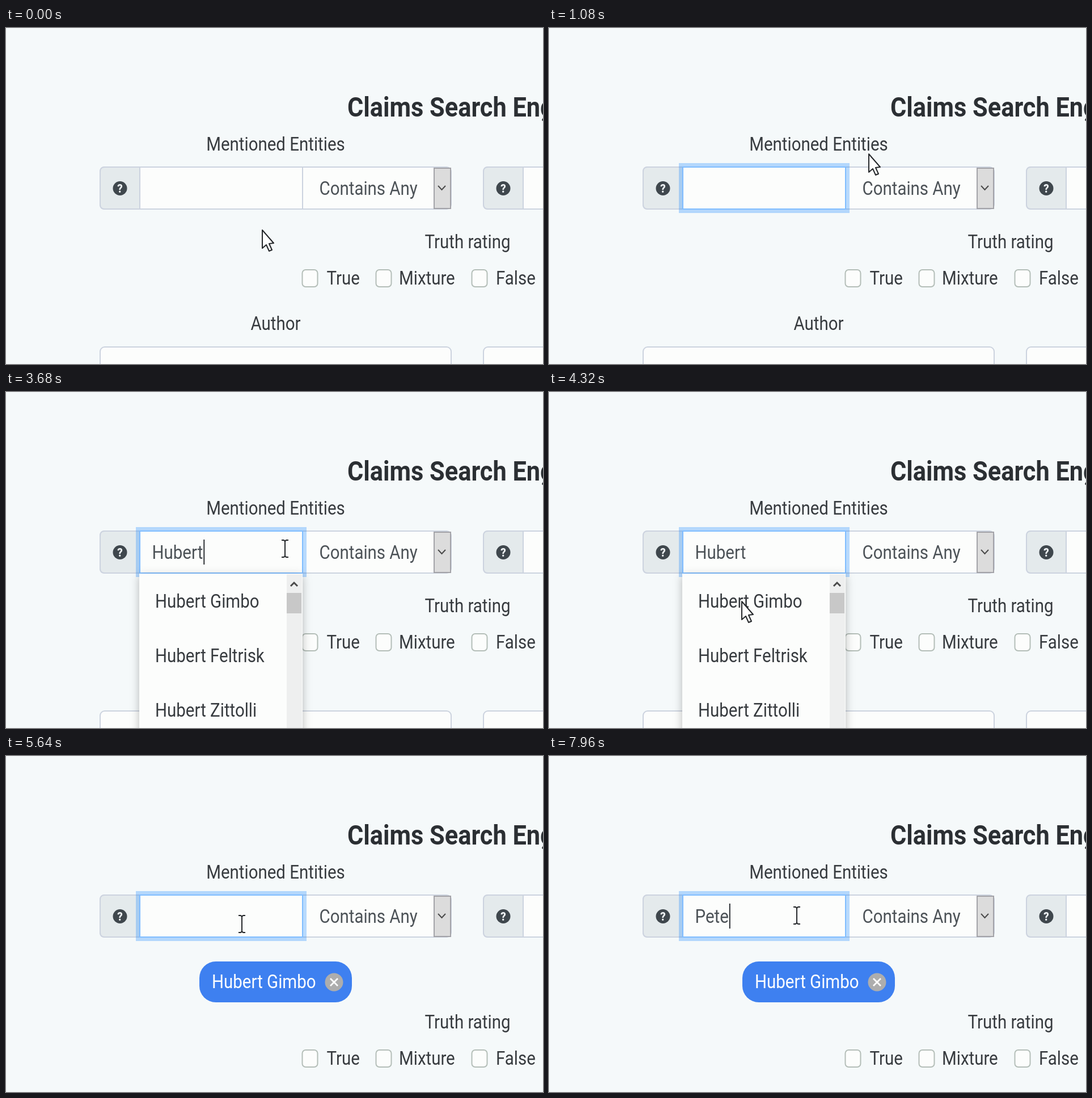
Animation of 947 by 592 pixels, one loop 8 s. Source, as an HTML page:

```html
<!DOCTYPE html>
<html lang="en">
<head>
<meta charset="utf-8">
<title>Claims search</title>
<style>
  html, body { margin: 0; width: 100%; height: 100%; overflow: hidden; background: #f5f9fa; }
  svg { display: block; width: 947px; height: 592px; }
  text { font: 33.2px Roboto, sans-serif; fill: #373b3f; white-space: pre; }
  .title { font-size: 48.8px; font-weight: 700; fill: #2b2f33; }
  .field { fill: #4c5257; }
  .light { fill: #fff; }
  .mark { font-size: 21px; font-weight: 900; fill: #eef2f5; }
  .mid { text-anchor: middle; }
  .serif { font: 26px "Liberation Serif", serif; fill: #fff; }
  .box { fill: #fcfdfc; stroke: #ccd3df; stroke-width: 2; }
  .addon { fill: #e4eaec; }
  .check { stroke: #b4beb8; }
  .shade { filter: drop-shadow(0 4px 8px #0004); }
</style>
</head>
<body>
<svg viewBox="0 0 947 592">
  <g id="page"></g>
  <g id="lower"></g>
  <g id="input">
    <rect id="glow" fill="#007bff"></rect>
    <rect id="frame" class="box" x="236" y="245" width="287" height="74"></rect>
    <g id="typed"></g>
    <path id="caret" stroke="#2c3033" stroke-width="2"></path>
  </g>
  <g id="list"></g>
  <g id="pill"></g>
  <g id="cursor">
    <path id="arrow" d="M0 0V32L7 26L12 37L17 35L12 24L20 23Z" fill="#fff" stroke="#25282b" stroke-width="2" stroke-linejoin="round"></path>
    <path id="beam" d="M-6-15h4l2 2l2-2h4M0-13V13M-6 15h4l2-2l2 2h4" fill="none" stroke="#25282b" stroke-width="2"></path>
  </g>
</svg>
<script>
const LOOP = 8000, CONDENSE = 0.888, TEXT_X = 257.5;
const $ = id => document.getElementById(id);
const clamp = v => Math.max(0, Math.min(1, v));

// The whole page uses one condensed cut of the typeface.
const label = (x, y, s, cls = '') =>
  `<text class="${cls}" transform="translate(${x} ${y}) scale(${CONDENSE} 1)">${s}</text>`;
const box = (x, y, w, h, r = 0, cls = '') =>
  `<rect class="box ${cls}" x="${x}" y="${y}" width="${w}" height="${h}" rx="${r}"/>`;
const help = x =>
  `<path class="box addon" d="M${x + 70} 245H${x + 8}q-8 0-8 8V311q0 8 8 8H${x + 70}Z"/>
   <circle cx="${x + 35}" cy="282.500" r="12.500" fill="#3f474d"/>` + label(x + 35, 290, '?', 'mark mid');
const check = (x, textX, s) => box(x, 426, 27, 30, 6, 'check') + label(textX, 452, s);

$('page').innerHTML =
  label(602, 156, 'Claims Search Engine', 'title') +
  label(475.5, 216, 'Mentioned Entities', 'mid') +
  box(166, 245, 619, 74, 8) + help(166) +
  '<path d="M523 245V319" stroke="#ccd3df" stroke-width="2"/>' +
  label(552.5, 294, 'Contains Any', 'field') +
  `<rect x="755" y="247" width="29" height="71" fill="#dcdcdc" stroke="#a3a3a8" stroke-width="2"/>
   <path d="M762 278l6.500 7l6.500-7" fill="none" stroke="#4a4a4a" stroke-width="2"/>` +
  box(842, 245, 300, 74, 8) + help(842);

$('lower').innerHTML =
  label(814, 388, 'Truth rating', 'mid') +
  check(522.5, 565.5, 'True') + check(652.5, 693, 'Mixture') + check(821.5, 864, 'False') +
  label(475.5, 532, 'Author', 'mid') +
  box(166, 562, 619, 74, 8) + box(842, 562, 300, 74, 8);

$('list').innerHTML =
  `<rect class="shade" x="235" y="320" width="288" height="300" fill="#fcfdfc"/>
   <rect x="495" y="321" width="27" height="271" fill="#eeefef"/>
   <rect x="495" y="354" width="26" height="36" fill="#c8c8c8"/>
   <path d="M502 342l6-6l6 6" fill="none" stroke="#4a4a4a" stroke-width="3"/>` +
  ['Gimbo', 'Feltrisk', 'Zittolli'].map((s, i) => label(263, 380 + 96 * i, 'Hubert ' + s)).join('');

// The close button shows its ligature word until the icon is ready.
const pill = (x, icon) =>
  `<rect x="${x}" y="362" width="${951 - 2 * x}" height="72" rx="29" fill="#3e80f0"/>` +
  label(x + 22, 409, 'Hubert Gimbo', 'light') + icon;
const pillWord = pill(329,
  `<ellipse cx="578.500" cy="403" rx="29.500" ry="16.500" fill="#a9a9a9"/>
   <text class="serif mid" x="578.500" y="411">close</text>`);
const pillIcon = pill(341,
  `<circle cx="578.500" cy="398.500" r="16" fill="#adadad"/>
   <path d="M572 392l13 13m0-13l-13 13" stroke="#fff" stroke-width="2.800"/>`);

const FOCUS = 500, OPEN = 2960, BLUR = 4700, PICK = 4820, ICON = 5120;
const keys = [
  [1780, 'H'], [1960, 'Hu'], [2140, 'Hub'], [2340, 'Hube'], [2520, 'Huber'], [2600, 'Hubert'],
  [PICK, ''], [7400, 'P'], [7620, 'Pe'], [7760, 'Pet'], [7900, 'Pete']
];
const path = [
  [0, 452, 356], [120, 452, 356], [420, 430, 285], [640, 430, 285], [1000, 564, 222],
  [3420, 564, 222], [3660, 492, 276], [3720, 492, 276], [4200, 340, 369], [4960, 340, 369],
  [5440, 416, 296], [5900, 416, 296], [6300, 437, 281], [LOOP, 437, 281]
];

function pointerAt(t) {
  const i = path.findIndex(p => p[0] > t);
  const [t0, x0, y0] = path[i - 1], [t1, x1, y1] = path[i];
  const p = (t - t0) / (t1 - t0), e = p * p * (3 - 2 * p);
  return [x0 + (x1 - x0) * e, y0 + (y1 - y0) * e];
}

function show(id, on) { $(id).style.display = on ? '' : 'none'; }

function setContent(id, html) {
  const el = $(id);
  if (el.content !== html) el.innerHTML = el.content = html;
}

function draw(t) {
  const picked = t >= PICK;
  const focused = t >= FOCUS && (t < BLUR || picked);
  const focus = t < BLUR ? clamp((t - FOCUS) / 150) : Math.max(clamp(1 - (t - BLUR) / 100), clamp((t - PICK) / 150));

  const spread = 6 * focus, glow = $('glow');
  glow.setAttribute('x', 235 - spread);
  glow.setAttribute('y', 244 - spread);
  glow.setAttribute('width', 289 + 2 * spread);
  glow.setAttribute('height', 76 + 2 * spread);
  glow.setAttribute('opacity', 0.27 * focus);
  const mix = (a, b) => a + (b - a) * focus;
  $('frame').style.stroke = `rgb(${mix(204, 128)},${mix(211, 189)},${mix(223, 255)})`;

  const [keyTime, word] = keys.filter(k => k[0] <= t).pop() || [FOCUS, ''];
  setContent('typed', label(TEXT_X, 294, word, 'field'));
  const end = TEXT_X + 2 + $('typed').firstChild.getComputedTextLength() * CONDENSE;
  $('caret').setAttribute('d', `M${end} 260V304`);
  show('caret', focused && Math.floor((t - keyTime) / 530) % 2 === 0);

  show('list', t >= OPEN && !picked);
  show('pill', picked);
  setContent('pill', t < ICON ? pillWord : pillIcon);
  $('lower').setAttribute('transform', `translate(0 ${picked ? 92 : 0})`);

  const [x, y] = pointerAt(t);
  const inside = x > 236 && x < 522 && y > 246 && y < 318;
  $('cursor').setAttribute('transform', `translate(${x} ${y})`);
  show('beam', inside);
  show('arrow', !inside);
}

const start = performance.now();
function tick() {
  draw((performance.now() - start) % LOOP);
  requestAnimationFrame(tick);
}
tick();
</script>
</body>
</html>
```
